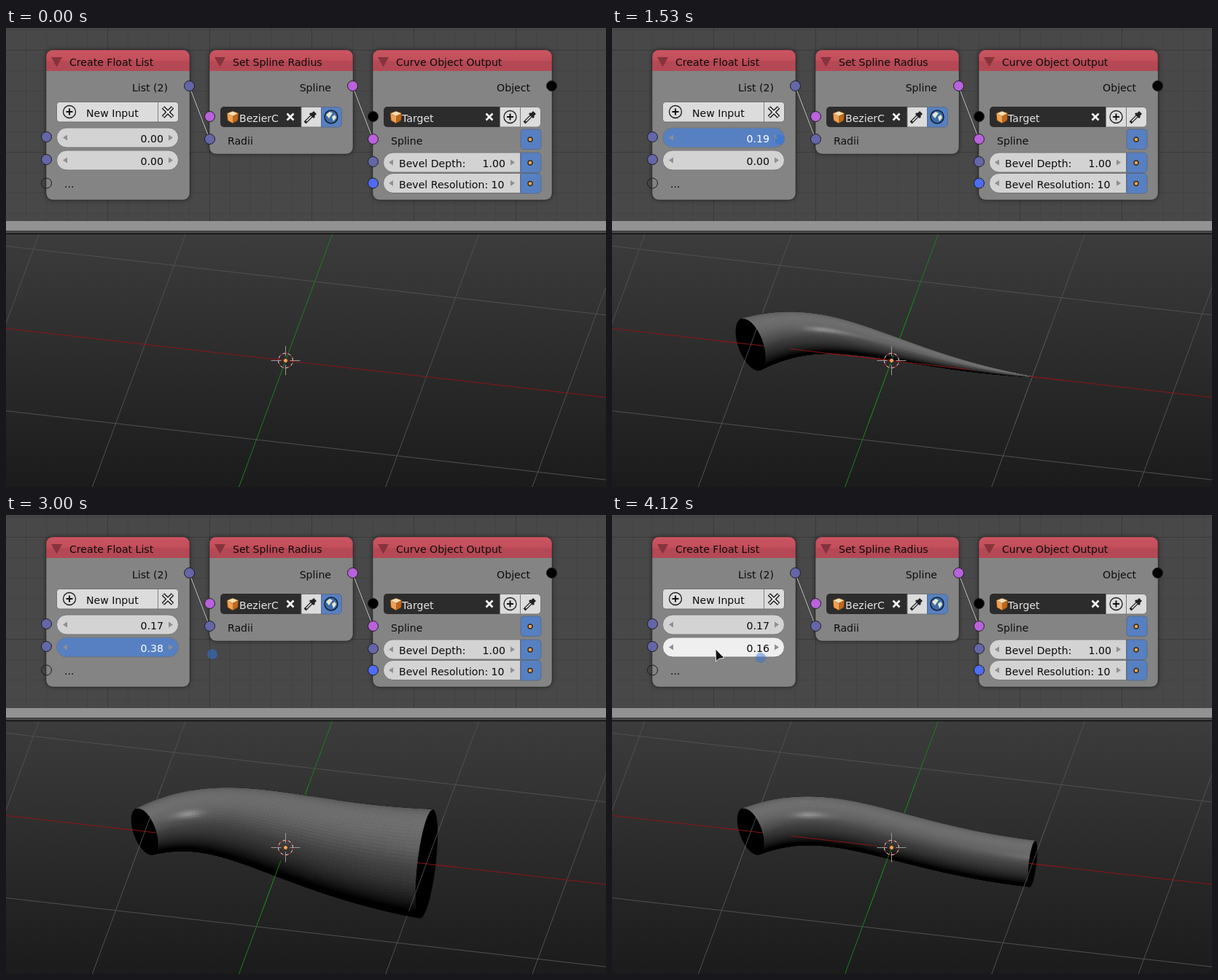
Recreate the animation shown at these times as an HTML page with a canvas. Size 823 px wide and 630 px high, loop 4160 ms.

```html
<!DOCTYPE html>
<html lang="en">
<head>
<meta charset="utf-8">
<title>Spline radius nodes</title>
<style>
  html, body { margin: 0; width: 100%; height: 100%; overflow: hidden; background: #484848; }
  canvas { display: block; }
</style>
</head>
<body>
<canvas id="stage" width="823" height="630"></canvas>
<script>
const ctx = document.getElementById('stage').getContext('2d');
const LOOP = 4160, TAU = Math.PI * 2;
const BLUE = '#5680c2', LIGHT = '#dcdcdc', FIELD = '#d3d3d3';
const FLOAT = '#6466a8', SPLINE = '#b962dc', INT = '#4f6cf4';

// Timing: bursts of [start, end, steps]; the picture rests in between.
const BURSTS = [[250, 740, 11], [780, 1250, 8], [1410, 1910, 10], [1950, 2120, 4],
  [2330, 2820, 9], [2880, 3380, 7], [3460, 3930, 8], [4120, 4120, 1]];
const RADIUS_A = [[740, 0], [780, .02], [980, .12], [1250, .21], [1410, .2], [1521, .19],
  [1577, .19], [1700, .17]];
const RADIUS_B = [[2120, 0], [2330, .02], [2514, .14], [2820, .25], [2880, .3], [2963, .38],
  [3047, .38], [3213, .41], [3380, .39], [3460, .33], [3527, .33], [3930, .16]];
const TOUCH = [[740, 161, 154], [1250, 243, 153], [1521, 230, 153], [1790, 237, 151], [2110, 237, 151],
  [2120, 148, 189], [2330, 174, 189], [2514, 210, 189], [2820, 238, 190], [2963, 283, 191],
  [3047, 283, 191], [3213, 297, 191], [3380, 289, 190], [3460, 260, 189], [3527, 260, 189],
  [3930, 204, 196]];
const POINTER = [[250, 247, 181], [450, 205, 172], [640, 158, 148], [1790, 158, 148],
  [1910, 150, 178], [2120, 142, 184]];

function snap(t) {
  const burst = BURSTS.filter(b => b[0] <= t).pop();
  if (!burst) return 0;
  const [start, end, steps] = burst;
  const gap = (end - start) / Math.max(1, steps - 1);
  return gap ? start + gap * Math.min(steps - 1, Math.floor((t - start) / gap + 1e-6)) : start;
}

function at(keys, t) {
  const next = keys.findIndex(k => k[0] > t);
  if (next === 0) return keys[0].slice(1);
  if (next < 0) return keys[keys.length - 1].slice(1);
  const a = keys[next - 1], b = keys[next], p = (t - a[0]) / (b[0] - a[0]);
  return a.slice(1).map((v, i) => v + (b[i + 1] - v) * p);
}

// Drawing helpers
function box(x, y, w, h, r, fill, stroke) {
  ctx.beginPath();
  ctx.roundRect(x, y, w, h, r);
  ctx.fillStyle = fill;
  ctx.fill();
  if (stroke) { ctx.strokeStyle = stroke; ctx.lineWidth = 1; ctx.stroke(); }
}
function poly(points, fill, stroke, width = 1) {
  ctx.beginPath();
  points.forEach(p => ctx.lineTo(p[0], p[1]));
  ctx.closePath();
  if (fill) { ctx.fillStyle = fill; ctx.fill(); }
  if (stroke) { ctx.strokeStyle = stroke; ctx.lineWidth = width; ctx.stroke(); }
}
function line(x1, y1, x2, y2, color, width = 1) {
  ctx.beginPath();
  ctx.moveTo(x1, y1);
  ctx.lineTo(x2, y2);
  ctx.strokeStyle = color;
  ctx.lineWidth = width;
  ctx.stroke();
}
function disc(x, y, r, fill, stroke, width = 1) {
  ctx.beginPath();
  ctx.arc(x, y, r, 0, TAU);
  if (fill) { ctx.fillStyle = fill; ctx.fill(); }
  if (stroke) { ctx.strokeStyle = stroke; ctx.lineWidth = width; ctx.stroke(); }
}
function label(text, x, y, color = '#0c0c0c', align = 'left') {
  ctx.font = '14.1px "DejaVu Sans", sans-serif';
  ctx.textAlign = align;
  ctx.fillStyle = color;
  ctx.fillText(text, x, y);
}
function socket(x, y, color) { disc(x, y, 7, color, '#1c1c1c'); }

// Icons
function cross(x, y, size, color, width) {
  line(x - size, y - size, x + size, y + size, color, width);
  line(x - size, y + size, x + size, y - size, color, width);
}
function plus(x, y) {
  disc(x, y, 8.5, null, '#1a1a1a', 1.3);
  line(x - 4.5, y, x + 4.5, y, '#111', 2);
  line(x, y - 4.5, x, y + 4.5, '#111', 2);
}
function cube(x, y) {
  poly([[x, y - 8], [x + 8, y - 5], [x, y - 1], [x - 8, y - 5]], '#f8dcae');
  poly([[x - 8, y - 5], [x, y - 1], [x, y + 9], [x - 7, y + 5]], '#eea256');
  poly([[x + 8, y - 5], [x, y - 1], [x, y + 9], [x + 7, y + 5]], '#bd691f');
  poly([[x, y - 8], [x + 8, y - 5], [x + 7, y + 5], [x, y + 9], [x - 7, y + 5], [x - 8, y - 5]], null, '#5e3511', .8);
}
function dropper(x, y) {
  line(x - 8, y + 8, x + 2, y - 2, '#222', 4);
  line(x - 6, y + 6, x + 1, y - 1, '#eee', 1.6);
  line(x - 1, y - 5, x + 5, y + 1, '#222', 3);
  line(x + 2, y - 2, x + 6, y - 6, '#222', 5.5);
}
function globe(x, y) {
  disc(x, y, 9, '#3e6ca6', '#16202e', 1.5);
  poly([[x - 7, y - 3], [x - 2, y - 7], [x + 2, y - 5], [x - 1, y - 1], [x - 3, y + 2]], '#e3e8cf');
  poly([[x + 1, y], [x + 5, y - 3], [x + 7, y + 1], [x + 3, y + 6]], '#e3e8cf');
}
function arrows(left, right, y) {
  poly([[left - 3, y], [left + 3, y - 4], [left + 3, y + 4]], '#8f8f8f');
  poly([[right + 3, y], [right - 3, y - 4], [right - 3, y + 4]], '#8f8f8f');
}
function toggle(y, corners) {
  box(706, y, 28, 27.5, corners, BLUE, '#5a6b88');
  disc(719, y + 14, 3, '#f0a64c', '#35271a', 1.4);
}

function node(x, w, h, title) {
  ctx.save();
  ctx.shadowColor = 'rgba(0,0,0,.5)';
  ctx.shadowBlur = 6;
  box(x, 30, w, h, 9, '#848484');
  ctx.restore();
  const head = ctx.createLinearGradient(0, 30, 0, 59);
  head.addColorStop(0, '#cb5663');
  head.addColorStop(.5, '#c24e5a');
  head.addColorStop(.55, '#b54854');
  head.addColorStop(1, '#b34955');
  box(x, 30, w, 29, [9, 9, 0, 0], head);
  box(x, 30, w, h, 9, 'transparent', 'rgba(30,30,30,.45)');
  poly([[x + 7, 40], [x + 22, 40], [x + 14.5, 53.5]], '#86333c');
  label(title, x + 32, 52);
}
function numberField(y, value, pressed, hovered) {
  box(69.5, y, 167, 27, 13.5, pressed ? BLUE : hovered ? '#efefef' : FIELD, '#767676');
  arrows(81, 226, y + 13.5);
  label(value.toFixed(2), 216, y + 20, pressed ? '#fff' : '#0c0c0c', 'right');
}

function drawEditor(a, b, active, hovered) {
  ctx.fillStyle = '#484848';
  ctx.fillRect(0, 0, 823, 266);
  for (const major of [false, true]) {
    const color = major ? '#393939' : '#424242';
    for (let i = -10; i < 20; i++) {
      if ((i % 5 === 0) !== major) continue;
      line(279.5 + i * 28, 0, 279.5 + i * 28, 265, color);
      line(0, 30.5 + i * 28, 823, 30.5 + i * 28, color);
    }
  }
  node(55, 197, 206, 'Create Float List');
  node(279, 197, 143, 'Set Spline Radius');
  node(503, 246, 206, 'Curve Object Output');
  for (const x of [251, 475]) {
    line(x, 79, x + 28, 152, 'rgba(0,0,0,.35)', 2.4);
    line(x, 79, x + 28, 152, '#b5b5b5', 1.2);
  }

  label('List (2)', 222, 87, undefined, 'right');
  box(69.5, 101.5, 167, 27.5, 4, LIGHT, '#717171');
  line(208.5, 102, 208.5, 129, '#808080');
  plus(87, 115);
  label('New Input', 110, 122);
  cross(222, 115.5, 6.5, '#1a1a1a', 5);
  cross(222, 115.5, 6, '#f2f2f2', 2);
  numberField(137, a, active === 1, hovered === 1);
  numberField(168, b, active === 2, hovered === 2);
  label('...', 80, 219);

  label('Spline', 446, 87, undefined, 'right');
  box(294, 108, 111, 28, [5, 0, 0, 5], '#2c2c2c');
  box(405, 108.5, 27.5, 27.5, 0, LIGHT, '#777');
  box(432.5, 108.5, 28, 27.5, [0, 5, 5, 0], BLUE, '#5a6b88');
  cube(311, 122);
  label('BezierC', 320, 129, '#e6e6e6');
  cross(390, 122, 4.5, '#f4f4f4', 2.6);
  dropper(418, 122);
  globe(446, 122);
  label('Radii', 304, 160);

  label('Object', 719, 87, undefined, 'right');
  box(518, 108, 160, 28, [5, 0, 0, 5], '#2c2c2c');
  box(677.5, 108.5, 28, 27.5, 0, LIGHT, '#777');
  box(705.5, 108.5, 28, 27.5, [0, 5, 5, 0], LIGHT, '#777');
  cube(535, 122);
  label('Target', 543, 129, '#e6e6e6');
  cross(663, 122, 4.5, '#f4f4f4', 2.6);
  plus(691.5, 122);
  dropper(719, 122);
  label('Spline', 528, 160);
  toggle(139, 4);
  for (const y of [171, 199.5]) {
    box(517.5, y, 188, 27, [13.5, 0, 0, 13.5], FIELD, '#767676');
    arrows(528, 695, y + 13.5);
    toggle(y, [0, 5, 5, 0]);
  }
  label('Bevel Depth:', 539, 191);
  label('1.00', 685, 191, undefined, 'right');
  label('Bevel Resolution: 10', 539, 219.5);

  for (const y of [149.5, 180.5]) socket(55.5, y, FLOAT);
  socket(55.5, 213, 'transparent');
  socket(251.5, 79.5, FLOAT);
  socket(279.5, 121.5, SPLINE);
  socket(279.5, 152.5, FLOAT);
  socket(475.5, 79.5, SPLINE);
  socket(503.5, 121.5, '#000');
  socket(503.5, 152.5, SPLINE);
  socket(503.5, 183.5, FLOAT);
  socket(503.5, 213, INT);
  socket(748.5, 79.5, '#000');
}

// Orthographic 3D view
const project = (x, y, z = 0) => [383.5 + 193 * x + 40 * y, 456.5 + 22.2 * x - 108.5 * y - 163 * z];
const depth = (x, y, z = 0) => .168 * x - .81 * y + .562 * z;
const dot = (a, b) => Math.max(0, a[0] * b[0] + a[1] * b[1] + a[2] * b[2]);
const KEY = [0, .45, .893], TOP = [.1, .99, .1], HALF = [0, .236, .972];

function shade([x, y, z]) {
  const n = [.979 * x + .203 * y, -.1126 * x + .5505 * y + .827 * z, depth(x, y, z)];
  if (n[2] < 0) return '#000';
  const v = Math.round(82 * dot(n, KEY) + 46 * dot(n, TOP) + 50 * dot(n, HALF) ** 120);
  return `rgb(${v},${v},${v})`;
}

function ringAt(t, r1, r2) {
  const u = 1 - t;
  const dx = 1.5 * u * u + 3 * u * t + 3 * t * t, dy = 1.5 * u * u - 3 * u * t;
  const speed = Math.hypot(dx, dy), slope = (r2 - r1) / speed, r = r1 + (r2 - r1) * t;
  const tx = dx / speed, ty = dy / speed, size = Math.hypot(1, slope);
  const cx = -u * u * u - 1.5 * u * u * t + t * t * t, cy = 1.5 * u * u * t;
  return angle => {
    const c = Math.cos(angle), s = Math.sin(angle);
    return {
      point: [cx - ty * c * r, cy + tx * c * r, s * r],
      normal: [(-ty * c - slope * tx) / size, (tx * c - slope * ty) / size, s / size]
    };
  };
}

function tubePieces(r1, r2) {
  const along = 64, around = 88, pieces = [];
  for (let i = 0; i < along; i++) {
    const [a, m, b] = [0, .5, 1].map(k => ringAt((i + k) / along, r1, r2));
    for (let j = 0; j < around; j++) {
      const p = j / around * TAU, q = (j + 1) / around * TAU, mid = m((p + q) / 2);
      const corners = [a(p), a(q), b(q), b(p)].map(v => project(...v.point));
      const color = shade(mid.normal);
      pieces.push({ z: depth(...mid.point), draw: () => poly(corners, color, color, .7) });
    }
  }
  return pieces;
}

const LINES = [];
for (let i = -3; i <= 3; i++) {
  if (!i) continue;
  LINES.push({ color: '#505050', at: s => [i, s] }, { color: '#505050', at: s => [s, i] });
}
LINES.push({ color: '#18801c', at: s => [0, s], reach: .8 }, { color: '#8e1418', at: s => [s, 0], reach: 1.2 });
LINES.filter(l => Math.abs(l.at(0)[0]) === 1 && l.at(0)[1] === 0).forEach(l => l.reach = .6);

function linePieces() {
  const pieces = [], step = .02;
  for (const l of LINES) {
    if (!l.reach) continue;
    for (let s = -l.reach; s < l.reach; s += step) {
      const from = project(...l.at(s)), to = project(...l.at(s + step));
      pieces.push({ z: depth(...l.at(s + step / 2)), draw: () => line(...from, ...to, l.color) });
    }
  }
  return pieces;
}

function drawView(r1, r2) {
  ctx.fillStyle = '#929292';
  ctx.fillRect(0, 265, 823, 13);
  ctx.fillStyle = '#444';
  ctx.fillRect(0, 278, 823, 4);
  ctx.fillStyle = '#000';
  ctx.fillRect(0, 282, 823, 1);
  ctx.save();
  ctx.beginPath();
  ctx.rect(0, 283, 823, 347);
  ctx.clip();
  const back = ctx.createLinearGradient(0, 283, 0, 630);
  back.addColorStop(0, '#3c3c3c');
  back.addColorStop(1, '#1b1b1b');
  ctx.fillStyle = back;
  ctx.fillRect(0, 283, 823, 347);
  for (const l of LINES) line(...project(...l.at(-5)), ...project(...l.at(5)), l.color);
  if (r1 > 0 || r2 > 0) {
    [...tubePieces(r1, r2), ...linePieces()].sort((a, b) => a.z - b.z).forEach(p => p.draw());
  }
  drawOrigin(383.5, 456.5);
  ctx.restore();
}

function drawOrigin(x, y) {
  for (let i = 0; i < 16; i++) {
    ctx.beginPath();
    ctx.arc(x, y, 10, i * TAU / 16, (i + 1) * TAU / 16);
    ctx.strokeStyle = i % 2 ? '#f0f0f0' : '#e02020';
    ctx.lineWidth = 1;
    ctx.stroke();
  }
  for (const d of [-1, 1]) {
    line(x + d * 6, y, x + d * 20, y, '#989898');
    line(x, y + d * 6, x, y + d * 20, '#989898');
  }
  disc(x, y, 3, '#f2a45a', '#3a2413');
}

function drawPointer(x, y) {
  poly([[x, y], [x + .5, y + 17], [x + 4.5, y + 13.5], [x + 12, y + 12]], '#111', '#ececec', 1);
}

function render(t) {
  const a = Math.round(at(RADIUS_A, t)[0] * 100) / 100;
  const b = Math.round(at(RADIUS_B, t)[0] * 100) / 100;
  const active = t >= 690 && t < 1790 ? 1 : t >= 2119 && t < 4120 ? 2 : 0;
  const pointing = t >= 250 && !active;
  const [px, py] = at(POINTER, t);
  const inside = pointing && px > 69 && px < 237;
  const hovered = inside && py > 137 && py < 165 ? 1 : inside && py > 168 && py < 196 ? 2 : 0;
  drawEditor(a, b, active, hovered);
  drawView(a, b);
  if (active || (t >= 1790 && t < 2000) || t >= 4120) {
    disc(...at(TOUCH, t), 7, `rgba(45,115,215,${t >= 4120 ? .45 : .55})`);
  }
  if (pointing) drawPointer(px, py);
}

const begin = performance.now();
let shown = -1;
function tick() {
  const t = snap((performance.now() - begin) % LOOP);
  if (t !== shown) render(shown = t);
  requestAnimationFrame(tick);
}
tick();
</script>
</body>
</html>
```
